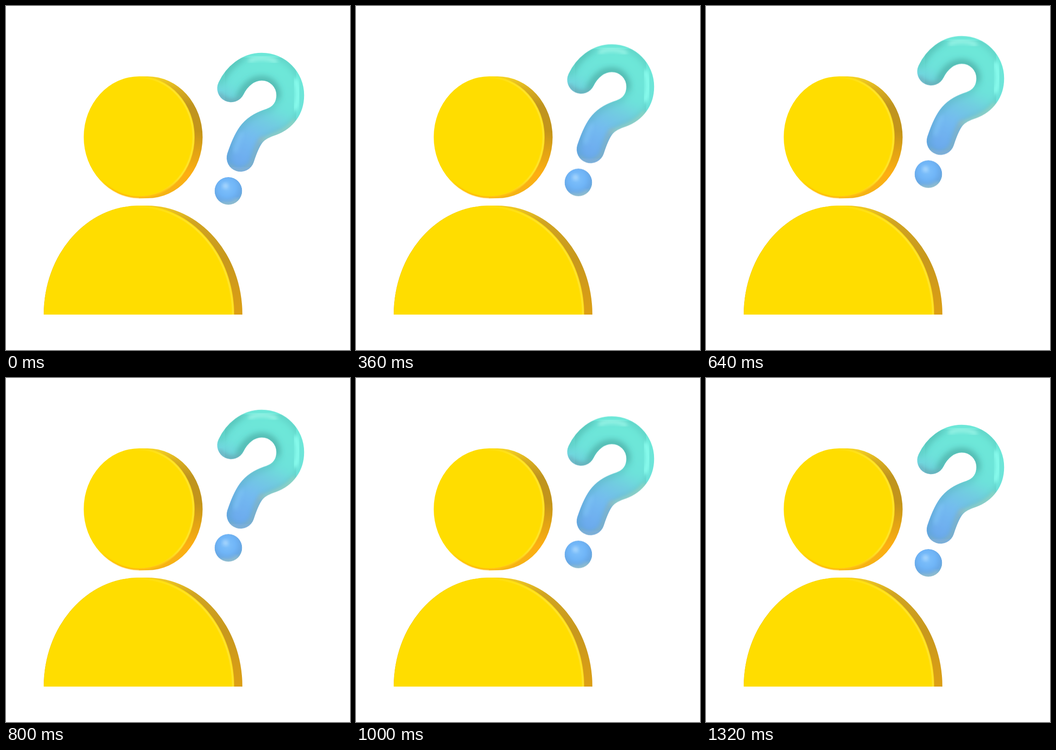
An HTML page for the animation above (1.36 s loop, 748 by 748 pixels).

```html
<!DOCTYPE html>
<html lang="en">
<head>
<meta charset="utf-8">
<title>Person with question mark</title>
<style>
  html, body { margin: 0; width: 100%; height: 100%; overflow: hidden; background: #fff; }
  svg { display: block; width: 100vw; height: 100vh; }
  .float { animation: float 1360ms infinite; }
  @keyframes float {
    0%, 100% { transform: translateY(0); }
    0%, 73.53% { animation-timing-function: cubic-bezier(.37, 0, 1, 1); }
    26.47%, 50% { animation-timing-function: cubic-bezier(0, 0, .63, 1); }
    26.47%, 73.53% { transform: translateY(-18.5px); }
    50% { transform: translateY(-36.7px); animation-timing-function: cubic-bezier(.37, 0, 1, 1); }
    73.53% { animation-timing-function: cubic-bezier(0, 0, .63, 1); }
  }
</style>
</head>
<body>
<svg viewBox="0 0 748 748">
  <defs>
    <linearGradient id="headSide" gradientUnits="userSpaceOnUse" x1="0" y1="153" x2="0" y2="418">
      <stop offset="0" stop-color="#f6d424"/>
      <stop offset=".1" stop-color="#d9ae20"/>
      <stop offset=".24" stop-color="#bf941f"/>
      <stop offset=".45" stop-color="#c3941a"/>
      <stop offset=".62" stop-color="#e2a314"/>
      <stop offset=".8" stop-color="#fdae12"/>
      <stop offset="1" stop-color="#f4b416"/>
    </linearGradient>
    <linearGradient id="bodySide" gradientUnits="userSpaceOnUse" x1="0" y1="434" x2="0" y2="671">
      <stop offset="0" stop-color="#f2cc24"/>
      <stop offset=".15" stop-color="#d0a421"/>
      <stop offset=".5" stop-color="#c8981d"/>
      <stop offset="1" stop-color="#dd9f14"/>
    </linearGradient>
    <linearGradient id="rim" x1="0" y1=".2" x2="1" y2=".4">
      <stop offset=".4" stop-color="#ffe840" stop-opacity="0"/>
      <stop offset=".75" stop-color="#ffe53a"/>
    </linearGradient>
    <linearGradient id="underRim" x1=".5" y1="0" x2=".5" y2="1">
      <stop offset=".84" stop-color="#ffb000" stop-opacity="0"/>
      <stop offset="1" stop-color="#ffad08"/>
    </linearGradient>
    <linearGradient id="markFill" gradientUnits="userSpaceOnUse" x1="600" y1="140" x2="500" y2="340">
      <stop offset="0" stop-color="#6de7d8"/>
      <stop offset=".34" stop-color="#6de2da"/>
      <stop offset=".52" stop-color="#72cbe1"/>
      <stop offset=".74" stop-color="#73b9f1"/>
      <stop offset="1" stop-color="#6caaee"/>
    </linearGradient>
    <radialGradient id="ball" cx=".45" cy=".38" r=".64">
      <stop offset="0" stop-color="#80c2fc"/>
      <stop offset=".5" stop-color="#70b5f7"/>
      <stop offset=".8" stop-color="#68a8e6"/>
      <stop offset="1" stop-color="#75b0cf"/>
    </radialGradient>
    <filter id="b1"><feGaussianBlur stdDeviation="1"/></filter>
    <filter id="b4" x="-50%" y="-50%" width="200%" height="200%"><feGaussianBlur stdDeviation="4"/></filter>
    <filter id="b7" x="-50%" y="-50%" width="200%" height="200%"><feGaussianBlur stdDeviation="7"/></filter>
    <path id="hook" d="M489.5 179C502 153 526 132 556 132C591 132 618 160 618 194C618 222 602 243 577 252C540 264 527 278 510 330"/>
    <mask id="hookMask" maskUnits="userSpaceOnUse" x="440" y="80" width="230" height="300">
      <use href="#hook" fill="none" stroke="#fff" stroke-width="60.5" stroke-linecap="round"/>
    </mask>
    <clipPath id="ballClip"><circle cx="483.5" cy="402" r="30"/></clipPath>
    <clipPath id="bodyClip"><path d="M82 671A207 237 0 0 1 289 434H307A207 237 0 0 1 514 671Z"/></clipPath>
  </defs>

  <path d="M289 153H308A119.5 132.5 0 0 1 308 418H289Z" fill="url(#headSide)"/>
  <ellipse cx="289.5" cy="285" rx="120.5" ry="132" fill="#ffdd00"/>
  <ellipse cx="289" cy="285.5" rx="118.5" ry="130.5" fill="none" stroke="url(#rim)" stroke-width="3" filter="url(#b1)"/>
  <ellipse cx="290" cy="285" rx="119" ry="131" fill="none" stroke="url(#underRim)" stroke-width="3" filter="url(#b1)"/>

  <g clip-path="url(#bodyClip)">
    <rect x="82" y="434" width="432" height="237" fill="url(#bodySide)"/>
    <ellipse cx="289" cy="671" rx="207" ry="237" fill="#ffdd00"/>
    <ellipse cx="288" cy="672" rx="205.5" ry="235.5" fill="none" stroke="url(#rim)" stroke-width="3" filter="url(#b1)"/>
  </g>

  <g class="float">
    <g mask="url(#hookMask)" fill="none" stroke-linecap="round">
      <rect x="440" y="80" width="230" height="300" fill="url(#markFill)"/>
      <use href="#hook" stroke="#3f9c98" stroke-opacity=".24" stroke-width="60" filter="url(#b1)"/>
      <use href="#hook" stroke="url(#markFill)" stroke-width="43" filter="url(#b7)"/>
      <path d="M508 196C519 172 536 160 556 160C576 160 589 175 589 196" stroke="#429d94" stroke-opacity=".6" stroke-width="12" filter="url(#b7)"/>
      <path d="M466 166C476 143 491 126 508 116" stroke="#4db7ac" stroke-opacity=".55" stroke-width="12" filter="url(#b7)"/>
      <path d="M466 193C476 208 495 211 508 202" stroke="#6ba4ac" stroke-opacity=".65" stroke-width="9" filter="url(#b4)"/>
      <path d="M556 293C575 282 605 278 627 251" stroke="#a5d8bd" stroke-opacity=".8" stroke-width="8" filter="url(#b4)"/>
      <path d="M557 288C543 302 543 322 536 339C526 356 505 364 488 350" stroke="#8eb4bd" stroke-opacity=".75" stroke-width="8" filter="url(#b4)"/>
      <path d="M531 118C548 111 570 112 586 120" stroke="#b6fff3" stroke-opacity=".7" stroke-width="8" filter="url(#b4)"/>
      <path d="M630 163C637 183 636 205 629 222" stroke="#8dfff1" stroke-opacity=".95" stroke-width="11" filter="url(#b4)"/>
      <path d="M512 278C505 291 502 302 499 314" stroke="#83c9fa" stroke-opacity=".55" stroke-width="10" filter="url(#b4)"/>
    </g>
    <g clip-path="url(#ballClip)">
      <circle cx="483.5" cy="402" r="30" fill="url(#ball)"/>
      <path d="M467 429Q487 436 505 421" fill="none" stroke="#9fc5cc" stroke-opacity=".8" stroke-width="9" filter="url(#b4)"/>
      <ellipse cx="477" cy="391" rx="5" ry="5" fill="#c4e5ff" filter="url(#b4)"/>
    </g>
  </g>
</svg>
</body>
</html>
```
